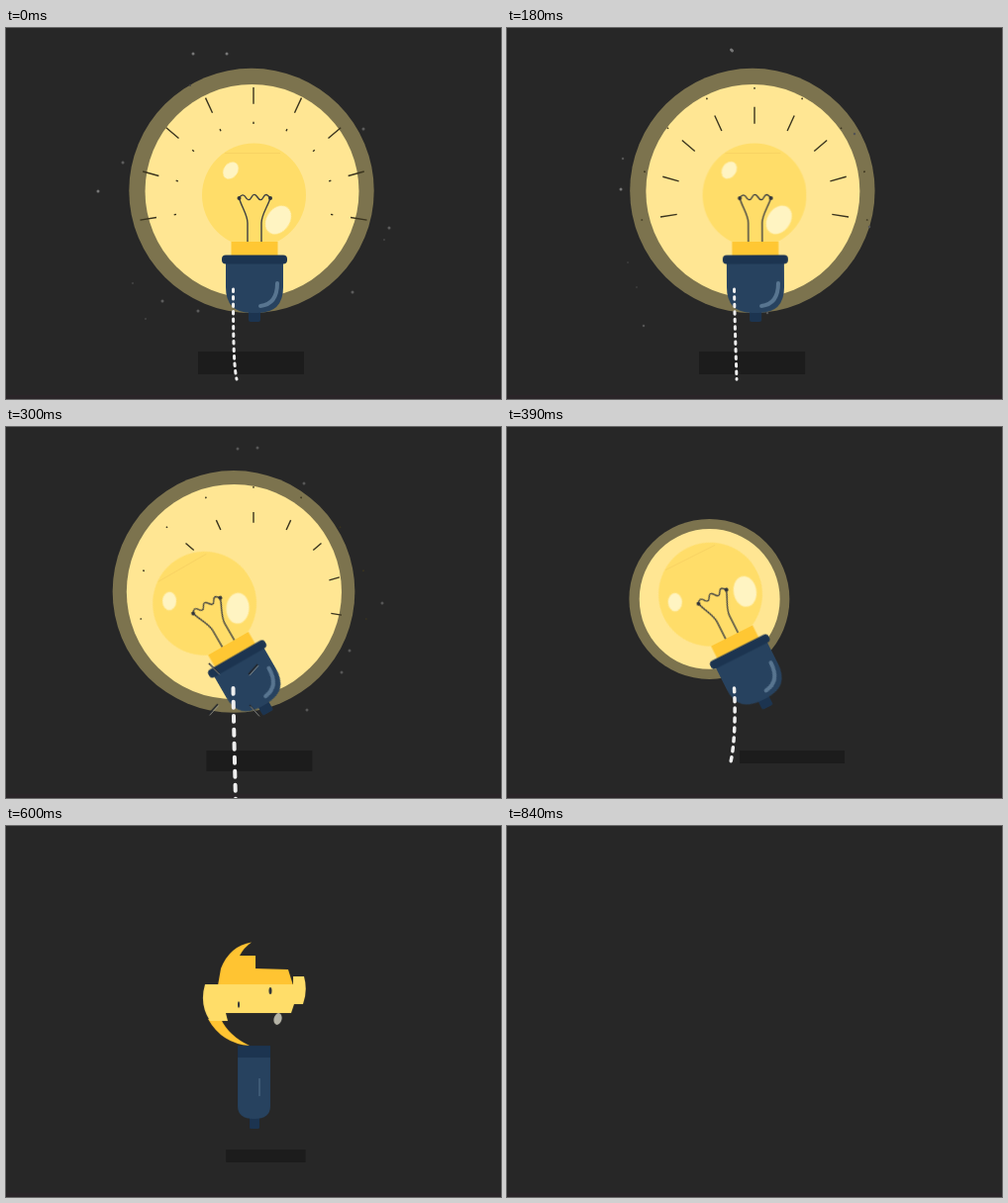
These frames come from a looping animation (500x375 px, 970 ms). An HTML page without scripts:

```html
<!DOCTYPE html>
<html lang="en">
<head>
<meta charset="utf-8">
<title>Light bulb</title>
<style>
html, body { margin: 0; width: 100%; height: 100%; overflow: hidden; background: #272727; }
svg { display: block; width: 500px; height: 375px; }
svg * { animation: 0s linear infinite; }

.shadow { fill: #1c1c1c; animation: shadow .97s linear infinite; }
.glow { animation: glow .97s linear infinite; }
.core { animation: core .97s linear infinite; }
.rays { fill: none; stroke: #3b351f; stroke-width: 1.4; animation: rays .97s linear infinite; }
.lamp { transform-origin: 251px 234px; animation: swing .97s linear infinite, lamp .97s step-end infinite; }
.base { transform-origin: 251px 263px; animation: squeeze .97s linear infinite; }
.wire { fill: none; stroke: #3e4042; stroke-width: 1.4; }
.lit { animation: lit .97s step-end infinite; }
.unlit { animation: unlit .97s step-end infinite; }
.eye { animation: eye .97s linear infinite; }
.shine { fill: #fff4c2; }
.shine.a { animation: shineA .97s linear infinite; }
.shine.b { animation: shineB .97s linear infinite; }
.cord { fill: none; stroke: #eee; stroke-linecap: round; animation: cord .97s linear infinite; }
.burst { transform-origin: 230px 265px; animation: burst .97s linear infinite, burstOn .97s step-end infinite; }
.shards { transform-origin: 250px 222px; animation: vanish .97s ease-in infinite, shardsOn .97s step-end infinite; }
.sparks { fill: none; stroke: #777; stroke-width: 3; stroke-linecap: round; transform-origin: 250px 166px; }
.sparks.a { animation: drift .97s linear infinite, sparksA .97s step-end infinite; }
.sparks.b { animation: sparksB .97s step-end infinite; }
.sparks.c { stroke: #565656; animation: sparksC .97s step-end infinite; }

@keyframes shadow {
  0%, 18.56% { x: 194px; width: 107px; height: 23px; }
  30.93% { x: 202px; width: 107px; height: 21px; }
  40.21% { x: 235px; width: 106px; height: 13px; }
  49.48% { x: 235px; width: 107px; height: 12px; }
  61.86% { x: 222px; width: 81px; height: 13px; }
  74%, 100% { x: 250px; width: 0; height: 12px; }
}
@keyframes glow {
  0%, 18.56% { cx: 248px; cy: 164.5px; r: 123.7px; }
  30.93% { cx: 230.3px; cy: 166.3px; r: 122.8px; }
  40.21% { cx: 203.7px; cy: 174px; r: 82.2px; }
  47%, 100% { cx: 250px; cy: 169px; r: 0; }
}
@keyframes core {
  0%, 18.56% { cx: 248.5px; cy: 165px; r: 108px; }
  30.93% { cx: 230.7px; cy: 166.5px; r: 109px; }
  40.21% { cx: 204px; cy: 174px; r: 72px; }
  47%, 100% { cx: 250px; cy: 169px; r: 0; }
}
@keyframes rays {
  0% { stroke-dasharray: 17 18; stroke-dashoffset: -20; visibility: visible; }
  18.56% { stroke-dasharray: 17 18; stroke-dashoffset: -70; }
  30.93% { stroke-dasharray: 11 24; stroke-dashoffset: -105; visibility: visible; }
  36%, 100% { stroke-dasharray: 0 35; stroke-dashoffset: -120; visibility: hidden; }
}
@keyframes swing {
  0%, 18.56% { transform: none; }
  30.93% { transform: translate(-17.5px, .5px) rotate(-30deg); }
  40.21% { transform: translate(-16px, -7px) rotate(-27deg); }
  49.48%, 100% { transform: none; }
}
@keyframes lamp { 0% { opacity: 1; } 57%, 100% { opacity: 0; } }
@keyframes squeeze { 0%, 49.48% { transform: none; } 57%, 100% { transform: scale(.6, 1.2); } }
@keyframes lit { 0% { opacity: 1; } 46%, 100% { opacity: 0; } }
@keyframes unlit { 0% { opacity: 0; } 46%, 100% { opacity: 1; } }
@keyframes eye {
  0%, 40.21% { cx: 235.5px; cy: 172px; rx: 2px; ry: 2px; }
  49.48%, 100% { cx: 235px; cy: 165px; rx: 1.5px; ry: 3px; }
}
@keyframes shineA {
  0% { transform: translate(227px, 144px) rotate(35deg); }
  18.56% { transform: translate(225px, 143.5px) rotate(33deg); }
  30.93% { transform: translate(221px, 149px) rotate(32deg); }
  40.21% { transform: translate(215px, 160px) rotate(26deg); }
  49.48%, 100% { transform: translate(221.5px, 149px) rotate(25deg); }
}
@keyframes shineB {
  0%, 18.56% { transform: translate(275px, 194px) rotate(35deg); }
  30.93% { transform: translate(277px, 190px) rotate(33deg); }
  40.21% { transform: translate(283px, 182px) rotate(17deg); }
  49.48%, 100% { transform: translate(283px, 183px) rotate(12deg); }
}
@keyframes cord {
  0% { d: path("M229.5 264C229.5 300 229.5 340 233 355"); stroke-width: 3; stroke-dasharray: 2.5 5; }
  18.56% { d: path("M229.5 264C230 295 231 325 232 355"); stroke-width: 3; stroke-dasharray: 2.5 5; }
  30.93% { d: path("M229.5 264C230 300 231 340 232 376"); stroke-width: 4; stroke-dasharray: 6 8; }
  40.21% { d: path("M229.5 264C231 290 230 325 225 343"); stroke-width: 3.5; stroke-dasharray: 4 6; }
  49.48% { d: path("M229.5 264C229.5 270 229.5 276 229.5 282"); stroke-width: 3; stroke-dasharray: 2.5 5; opacity: 1; }
  53%, 100% { d: path("M229.5 264C229.5 264 229.5 264 229.5 264"); stroke-width: 3; stroke-dasharray: 2.5 5; opacity: 0; }
}
@keyframes burst { 0%, 24% { transform: scale(.6); } 30.93% { transform: none; } 36%, 100% { transform: scale(1.25); } }
@keyframes burstOn { 0% { opacity: 0; } 24% { opacity: 1; } 36%, 100% { opacity: 0; } }
@keyframes vanish { 0%, 61.86% { transform: none; } 74%, 100% { transform: scale(0, .6); } }
@keyframes shardsOn { 0% { opacity: 0; } 57% { opacity: 1; } 74%, 100% { opacity: 0; } }
@keyframes drift { 0% { transform: none; } 18.56%, 100% { transform: rotate(2deg); } }
@keyframes sparksA { 0% { opacity: 1; } 10%, 100% { opacity: 0; } }
@keyframes sparksB { 0% { opacity: 0; } 10% { opacity: 1; } 25%, 100% { opacity: 0; } }
@keyframes sparksC { 0% { opacity: 0; } 25% { opacity: 1; } 36%, 100% { opacity: 0; } }
</style>
</head>
<body>
<svg viewBox="0 0 500 375">
  <rect width="500" height="375" fill="#272727"/>
  <rect y="371" width="500" height="4" fill="#2a2528"/>
  <rect class="shadow" x="194" y="327" width="107" height="23"/>

  <circle class="glow" fill="#7c734e"/>
  <circle class="core" fill="#ffe693"/>

  <g class="sparks a">
    <path d="M189 26h0M223 26h0M93 165h0"/>
    <path stroke="#5c5c5c" d="M118 136h0M361 102h0M387 202h0M350 267h0M194 286h0M158 276h0"/>
    <path stroke="#444" stroke-width="2" d="M186 58h0M382 214h0M141 294h0M128 258h0"/>
  </g>
  <g class="sparks b">
    <path d="M226.500 22l1 1M115 163h0"/>
    <path stroke="#555" stroke-width="2.500" d="M117 132h0M138 301h0M351 107h0M366 201h0M263 288h0"/>
    <path stroke="#3c3c3c" stroke-width="2" d="M122 237h0M131 262h0"/>
  </g>
  <path class="sparks c" d="M234 22h0M254 21h0M301 57h0M380 178h0M347 226h0M339 248h0M304 286h0"/>

  <g class="rays">
    <path d="M250 97V60"/>
    <path d="M250 97V60" transform="rotate(24.700 250 176)"/>
    <path d="M250 97V60" transform="rotate(49.500 250 176)"/>
    <path d="M250 97V60" transform="rotate(74.500 250 176)"/>
    <path d="M250 97V60" transform="rotate(99 250 176)"/>
    <path d="M250 97V60" transform="rotate(-24.700 250 176)"/>
    <path d="M250 97V60" transform="rotate(-49.500 250 176)"/>
    <path d="M250 97V60" transform="rotate(-74.500 250 176)"/>
    <path d="M250 97V60" transform="rotate(-99 250 176)"/>
  </g>

  <g class="lamp">
    <circle cx="250.500" cy="169" r="52.500" fill="#ffdd69"/>
    <path d="M221 126.500H277" stroke="#f8d363"/>
    <rect class="lit" x="227.500" y="216" width="47" height="15" fill="#ffc733"/>
    <ellipse class="shine a" rx="7" ry="9.300"/>
    <ellipse class="shine b" rx="11.500" ry="15.500"/>
    <g class="wire lit">
      <path d="M235.500 172C238 181 244 189 244 197V216M267 172C264 181 258 189 258 197V216"/>
      <path d="M235.500 172c2-4 5-4 6.500-1s4 4 6 0s4-3 6 0s4 4 6 0s4-3 7 1"/>
    </g>
    <g class="unlit">
      <path d="M214 128H228V118H214z" fill="#272727"/>
      <path d="M228 127.500Q236 118 250 116.500Q243 120 238 127.500z" fill="#ffc432"/>
      <path d="M231 211.500H270" stroke="#f3cc5c"/>
      <path class="wire" d="M258 218V228"/>
    </g>
    <ellipse class="eye" fill="#30343a"/>
    <circle cx="267" cy="172" r="2" fill="#30343a"/>
    <g class="base">
      <rect x="245" y="284" width="12" height="13" rx="2" fill="#1c3450"/>
      <path d="M222 236H280V262Q280 288 254 288H248Q222 288 222 262z" fill="#27425f"/>
      <rect x="218" y="229.500" width="66" height="9" rx="4" fill="#1c3450"/>
      <path d="M257 281Q274 279 274 258" fill="none" stroke="#587590" stroke-width="4" stroke-linecap="round"/>
    </g>
  </g>

  <g class="burst" fill="none" stroke-width="1.500">
    <path id="tick" d="M205 239l10 10M254 240l-9 10M214 280l-9 10M246 281l9 10" stroke="#20242a"/>
    <path d="M205 239l10 10M254 240l-9 10M214 280l-9 10M246 281l9 10" stroke="#a5a59c" stroke-width=".8" transform="translate(.8 1.200)"/>
  </g>
  <path class="cord" d="M229.500 264C229.500 300 229.500 340 233 355"/>

  <g class="shards">
    <g fill="#ffc432">
      <path d="M248 117.500Q226 121 217 144L214 161H290L285 145L252 144V131H236Q240 123 248 117.500z"/>
      <path d="M204 195Q218 220 246 222Q225 212 217 195z"/>
    </g>
    <path d="M201 160H290V152H301Q305 166 300 180H291L288 189H222L224 197H206Q195 180 201 160z" fill="#ffdd69"/>
    <ellipse cx="267" cy="166.500" rx="1.500" ry="3.500" fill="#30343a"/>
    <ellipse cx="235" cy="180.500" rx="1" ry="3.300" fill="#30343a"/>
    <ellipse cx="274.500" cy="195" rx="4" ry="6" fill="#b5b3a6" transform="rotate(15 274.500 195)"/>
    <rect x="246" y="292" width="10" height="14" rx="1.500" fill="#1c3450"/>
    <path d="M234 222H267V283Q267 296 250.500 296Q234 296 234 283z" fill="#27425f"/>
    <path d="M234 222H267V234H234z" fill="#1c3450"/>
    <path d="M256 255V273" stroke="#587590"/>
  </g>
</svg>
</body>
</html>
```
